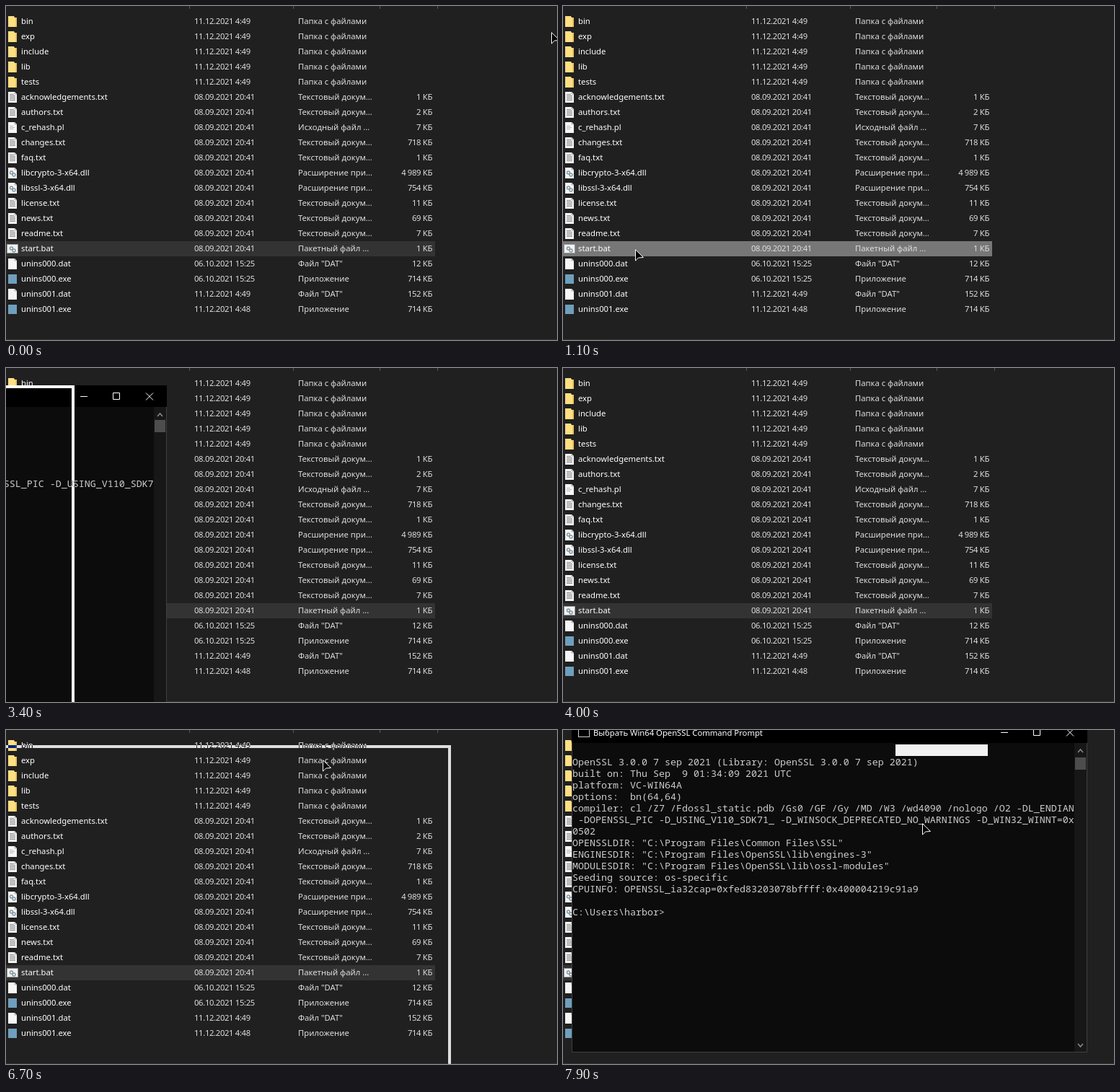
An HTML page that plays this animation: 764x463 px, repeating every 8000 ms.

```html
<!DOCTYPE html>
<html lang="ru">
<head>
<meta charset="utf-8">
<style>
html, body { margin: 0; width: 100%; height: 100%; overflow: hidden; background: #202020; }
#stage { position: relative; width: 764px; height: 463px; overflow: hidden; isolation: isolate;
  background: #202020; color: #dedede; font: 11.25px/20px "Noto Sans", "Open Sans", sans-serif; white-space: pre; }
#stage * { position: absolute; box-sizing: border-box; }
.tick { top: 0; width: 1px; height: 4px; background: #5a5a5a; }
.base { top: 462px; width: 764px; height: 1px; background: #333; }
.row { left: 0; width: 595px; height: 21px; }
.row svg { left: 0; top: 2px; }
.name { left: 21px; color: #fff; }
.date { left: 261px; letter-spacing: -.33px; }
.kind { left: 405px; }
.size { right: 4px; letter-spacing: -.33px; }
.win { background: #0c0c0c; outline: 1px solid #404040; outline-offset: -1px; }
.bar { width: 100%; height: 30px; background: #000; }
.icon { left: 9px; top: 10px; width: 16px; height: 12px; background: #000; border: 1px solid #ccc; }
.title { left: 30px; top: 6px; color: #fff; }
.btns { right: 0; top: 0; }
.text { left: 1px; top: 32px; color: #ccc; font: 13.333px/16px "Noto Sans Mono", "DejaVu Sans Mono", monospace; }
.scroll { right: 1px; top: 30px; bottom: 1px; width: 17px; background: #171717; }
.thumb { left: 1px; width: 15px; height: 17px; background: #4d4d4d; }
.scroll svg { left: 4px; }
.sel { left: 449px; top: 32px; width: 128px; height: 16px; background: #f2f2f2; }
#frame { border: 4px solid #fff; mix-blend-mode: difference; }
</style>
</head>
<body>
<div id="stage"></div>
<script>
const stage = document.getElementById('stage');

function add(parent, cls, html = '', style = '') {
  const el = document.createElement('div');
  el.className = cls;
  el.innerHTML = html;
  el.style.cssText = style;
  return parent.appendChild(el);
}
const svg = (w, h, body, attrs = '') => `<svg width="${w}" height="${h}" ${attrs}>${body}</svg>`;

// File list
const page = '<path d="M3 1h9l3 3v12H3z" fill="#f6f6f6"/><path d="M12 1v3h3" fill="none" stroke="#aaa"/>';
const gears = `<g fill="none" stroke="#8097a3" stroke-width="1.5">
  <circle cx="7.5" cy="8" r="2"/><circle cx="11" cy="11" r="2"/></g>`;
const icons = {
  dir: '<path d="M3 1h8l1 2h3v13H3z" fill="#ffdf83"/><path d="M13 3h2v13h-2z" fill="#eec45c"/>',
  txt: page + '<path d="M5 4.5h6M5 6.5h8M5 8.5h8M5 10.5h8M5 12.5h8" stroke="#888"/>',
  pl: page + '<path d="M5 6.5h5M5 8.5h7M5 10.5h5" stroke="#bbb"/>',
  dll: page + gears,
  bat: '<path d="M1.5 2.5h15v12h-15z" fill="#f2f2f2" stroke="#999"/>' + gears,
  dat: page,
  exe: '<path d="M3 2h12v13H3z" fill="#6f9fbd"/>'
};
const kinds = { dir: 'Папка с файлами', txt: 'Текстовый докум...', pl: 'Исходный файл ...',
  dll: 'Расширение при...', bat: 'Пакетный файл ...', dat: 'Файл "DAT"', exe: 'Приложение' };
const dec = '11.12.2021 4:49', sep = '08.09.2021 20:41', oct = '06.10.2021 15:25';
const files = [
  ['bin', dec], ['exp', dec], ['include', dec], ['lib', dec], ['tests', dec],
  ['acknowledgements.txt', sep, '1'], ['authors.txt', sep, '2'], ['c_rehash.pl', sep, '7'],
  ['changes.txt', sep, '718'], ['faq.txt', sep, '1'], ['libcrypto-3-x64.dll', sep, '4 989'],
  ['libssl-3-x64.dll', sep, '754'], ['license.txt', sep, '11'], ['news.txt', sep, '69'],
  ['readme.txt', sep, '7'], ['start.bat', sep, '1'], ['unins000.dat', oct, '12'],
  ['unins000.exe', oct, '714'], ['unins001.dat', dec, '152'], ['unins001.exe', '11.12.2021 4:48', '714']
];
for (const x of [254, 398, 518, 598]) add(stage, 'tick', '', `left:${x}px`);
add(stage, 'base');
const rows = files.map(([name, date, size], i) => {
  const type = name.includes('.') ? name.split('.').pop() : 'dir';
  const row = add(stage, 'row', svg(18, 17, icons[type]), `top:${11 + 21 * i}px`);
  add(row, 'name', name);
  add(row, 'date', date);
  add(row, 'kind', kinds[type]);
  if (size) add(row, 'size', size + ' КБ');
  return row;
});
const batch = rows[15];

// Console windows
const output = String.raw`
OpenSSL 3.0.0 7 sep 2021 (Library: OpenSSL 3.0.0 7 sep 2021)
built on: Thu Sep  9 01:34:09 2021 UTC
platform: VC-WIN64A
options:  bn(64,64)
compiler: cl /Z7 /Fdossl_static.pdb /Gs0 /GF /Gy /MD /W3 /wd4090 /nologo /O2 -DL_ENDIAN -DOPENSSL_PIC -D_USING_V110_SDK71_ -D_WINSOCK_DEPRECATED_NO_WARNINGS -D_WIN32_WINNT=0x0502
OPENSSLDIR: "C:\Program Files\Common Files\SSL"
ENGINESDIR: "C:\Program Files\OpenSSL\lib\engines-3"
MODULESDIR: "C:\Program Files\OpenSSL\lib\ossl-modules"
Seeding source: os-specific
CPUINFO: OPENSSL_ia32cap=0xfed83203078bffff:0x400004219c91a9

C:\Users\harbor>`;
const caption = 'Win64 OpenSSL Command Prompt';
const buttons = svg(130, 30,
  '<path d="M10 15.5h10M55.5 10.5h9v9h-9zM101 10.5l10 10M111 10.5l-10 10" fill="none" stroke="#fff"/>', 'class="btns"');
const arrow = (d, y) => svg(9, 7, `<path d="${d}" fill="none" stroke="#888" stroke-width="1.6"/>`, `style="top:${y}px"`);

function makeWindow(x, y, cols, h, thumbY, content) {
  const win = add(stage, 'win', '', `left:${x}px;top:${y}px;width:${cols * 8 + 19}px;height:${h}px`);
  add(win, 'bar', buttons);
  add(win, 'icon');
  win.title_ = add(win, 'title', caption);
  win.text_ = add(win, 'text');
  win.text_.textContent = content.replace(new RegExp(`.{${cols}}`, 'g'), '$&\n');
  add(win, 'scroll', arrow('M1 6l3.5-4L8 6', 7) + arrow('M1 1l3.5 4L8 1', h - 43) +
    `<div class="thumb" style="top:${thumbY}px"></div>`);
  return win;
}
const wide = makeWindow(-756, 24, 120, 520, 18, caption + '\n' + output);
const narrow = makeWindow(12, -12, 87, 459, 20, output);
const sel = add(narrow, 'sel');

const frame = add(stage, '');
frame.id = 'frame';
const pointer = add(stage, '', svg(13, 18,
  '<path d="M.5.8v15.4l4-4.2 7-.5z" fill="#000" stroke="#fff"/>'));

// Motion
const mix = (a, b, k) => a + (b - a) * k;
const part = (t, a, b) => Math.min(1, Math.max(0, (t - a) / (b - a)));
const ease = k => k * k * (3 - 2 * k);
const between = (t, a, b) => t >= a && t < b;
const show = (el, on) => { el.style.visibility = on ? 'inherit' : 'hidden'; };

function dragPos(t) {
  const k = ease(part(t, 6200, 7000)), back = ease(part(t, 7000, 7300));
  return [mix(-377, 31, k) - 19 * back, mix(80, -7, k) - 5 * back];
}

function pointerPos(t) {
  if (t < 1600) {
    const k = ease(part(t, 0, 900)), j = part(t, 900, 1100);
    return [mix(756, 120, k) - 20 * j, mix(36, 331, k) + 6 * j];
  }
  if (t < 2300) {
    const k = ease(part(t, 1500, 2300));
    return [mix(100, -14, k), mix(337, 60, k)];
  }
  if (between(t, 5100, 5500)) return [[142, 85], [230, 68], [289, 75], [180, 82]][(t - 5100) / 100];
  if (between(t, 6200, 7600)) {
    const [x, y] = dragPos(t);
    return [x + mix(570, 517, part(t, 6200, 7000)), y + 20 + part(7300 - t, 0, 1100)];
  }
  if (t >= 7600) {
    const k = part(t, 7600, 7900);
    return [mix(529, 498, k), mix(8, 129, k * (.6 + .4 * k))];
  }
  return null;
}

function draw(now) {
  const t = Math.floor(now % 8000 / 100) * 100;
  const pos = pointerPos(t);
  show(pointer, pos);
  if (pos) pointer.style.transform = `translate(${Math.round(pos[0])}px,${Math.round(pos[1])}px)`;

  const hover = t < 1600 && pos[0] < 595 && pos[1] >= 326;
  batch.style.background = hover ? '#777' : '#333';

  show(wide, between(t, 1600, 4000));
  show(wide.text_, t >= 1800);
  show(narrow, t >= 7600);
  show(sel, t >= 7700);
  narrow.title_.textContent = (t >= 7700 ? 'Выбрать ' : '') + caption;

  const first = t === 3400;
  show(frame, first || between(t, 6200, 7600));
  const [x, y] = first ? [-884, 24] : dragPos(t);
  Object.assign(frame.style, { left: Math.round(x) + 'px', top: Math.round(y) + 'px',
    width: (first ? 979 : 715) + 'px', height: (first ? 520 : 459) + 'px' });
}

const start = performance.now();
function tick() {
  draw(performance.now() - start);
  requestAnimationFrame(tick);
}
tick();
</script>
</body>
</html>
```
